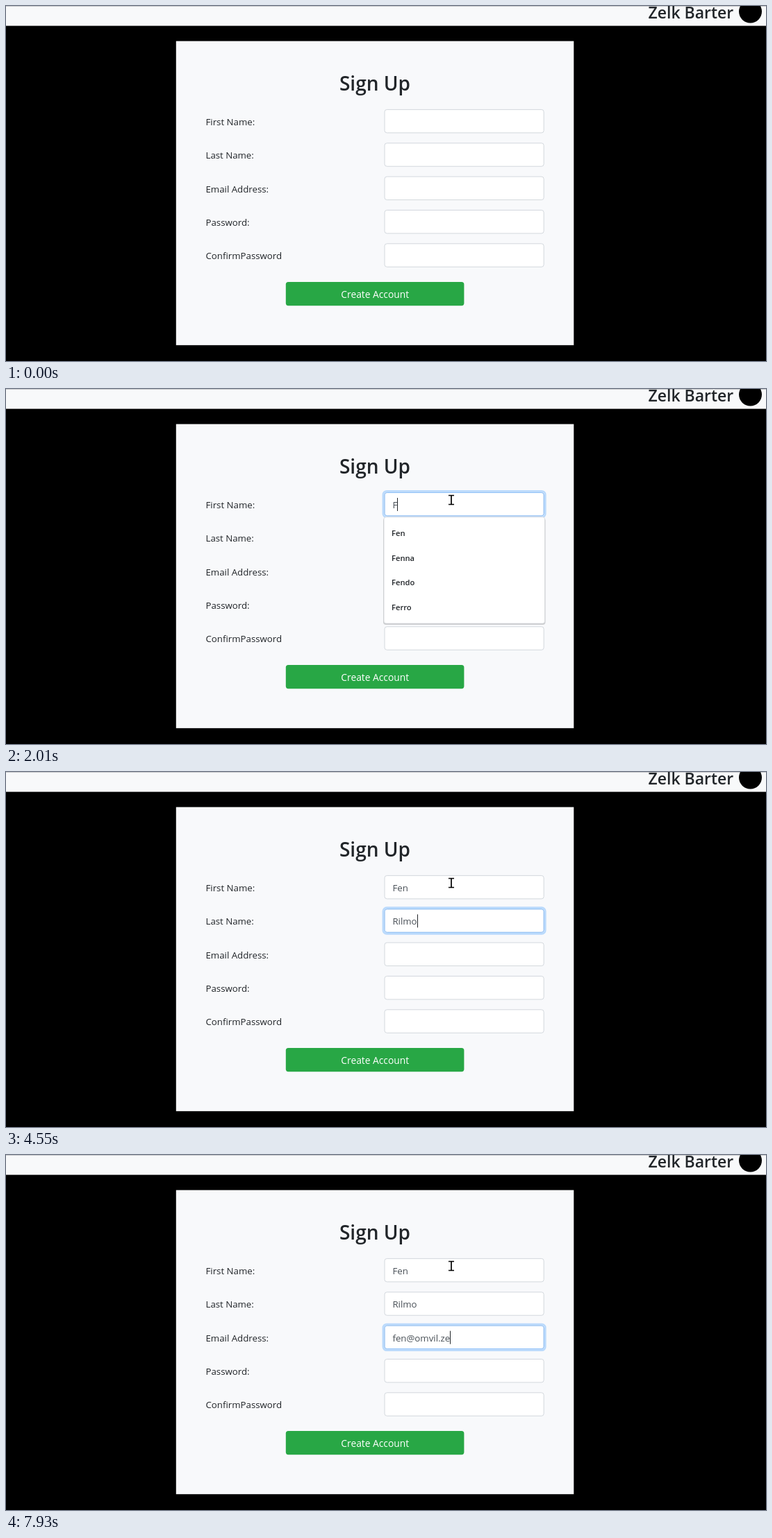
Recreate the animation shown at these times as an HTML page. Size 1094 by 512 pixels, loop 8000 ms.

```html
<!DOCTYPE html>
<html lang="en">
<head>
<meta charset="utf-8">
<title>Sign Up</title>
<style>
  html, body { margin: 0; height: 100%; overflow: hidden; background: #000; }
  svg { display: block; width: 100vw; height: 100vh; font: 13.25px "Open Sans", "Noto Sans", sans-serif; fill: #212529; }
  .head { font-weight: 600; }
  .item { font-size: 11.2px; font-weight: 600; }
  .value { fill: #495057; }
</style>
</head>
<body>
<svg id="stage" viewBox="0 0 1094 512">
  <rect width="1094" height="512" fill="#000"/>
  <rect width="1094" height="28.6" fill="#f8f9fa"/>
  <rect width="1094" height="1" fill="#c8cacc"/>
  <text class="head" x="924.5" y="18" font-size="23">Zelk Barter</text>
  <circle cx="1071.5" cy="8" r="16.5" fill="#000"/>
  <rect x="244.8" y="50.6" width="572.5" height="438.6" fill="#f8f9fb"/>
  <text class="head" x="531" y="122" font-size="28" text-anchor="middle">Sign Up</text>
  <g id="form"></g>
  <rect x="402.8" y="398" width="256.6" height="34.2" rx="3.6" fill="#28a745"/>
  <text x="531.2" y="421" fill="#fff" font-size="13.8" text-anchor="middle">Create Account</text>
  <g id="menu">
    <rect id="shadow" x="543" width="233.5" rx="4" fill="#000" opacity=".18"/>
    <rect id="sheet" x="544" width="231.5" rx="3" fill="#fff" stroke="#d5d8dc" stroke-width=".8"/>
    <g id="items"></g>
  </g>
  <path id="caret" stroke="#212529"/>
  <g id="mouse">
    <path id="arrow" d="M0 0V16.5L3.8 12.9L6.4 18.8L8.8 17.8L6.2 12H11.6Z" fill="#fff" stroke="#000"/>
    <g id="beam" fill="none">
      <path d="M-4 -6.5H4M0 -6.5V6.5M-4 6.5H4" stroke="#fff" stroke-width="3.4"/>
      <path d="M-4 -6.5H4M0 -6.5V6.5M-4 6.5H4" stroke="#000" stroke-width="1.7"/>
    </g>
  </g>
</svg>
<script>
const LOOP = 8000, LEFT = 545, WIDTH = 229.2, HEIGHT = 33.5, TEXT_X = 556.4;
const $ = id => document.getElementById(id);
const clamp = v => Math.max(0, Math.min(1, v));

function add(parent, tag, attrs, text = "") {
  const el = document.createElementNS("http://www.w3.org/2000/svg", tag);
  set(el, attrs);
  el.textContent = text;
  return parent.appendChild(el);
}
function set(el, attrs) {
  for (const k in attrs) el.setAttribute(k, attrs[k]);
}

// focus: when the field becomes active; keys: when each letter is typed
const fields = [
  { label: "First Name:", text: "Fen", focus: 1280, keys: [2010, 2220, 2400], open: 1400,
    hints: ["Fen", "Fenna", "Olva", "Fendo", "Marn", "Ferro", "Juk"] },
  { label: "Last Name:", text: "Rilmo", focus: 2880, keys: [3560, 3810, 3970, 4150, 4360], open: 3600,
    hints: ["Rilmo"] },
  { label: "Email Address:", text: "fen@omvil.ze", focus: 4590,
    keys: [5080, 5260, 5460, 6450, 6980, 7110, 7260, 7350, 7450, 7650, 7860, 7930] },
  { label: "Password:" },
  { label: "ConfirmPassword" }
];

fields.forEach((f, i) => {
  f.y = 149.4 + 48.35 * i;
  const textY = f.y + 22.6;
  add($("form"), "text", { x: 287.5, y: textY }, f.label);
  f.ring = add($("form"), "rect", { x: LEFT - 2, y: f.y - 2, width: WIDTH + 4, height: HEIGHT + 4, rx: 5,
    fill: "none", stroke: "#007bff", "stroke-opacity": .25, "stroke-width": 2.9 });
  const box = { x: LEFT, y: f.y, width: WIDTH, height: HEIGHT, rx: 3.4, "stroke-width": .9 };
  add($("form"), "rect", { ...box, fill: "#fff", stroke: "#ced4da" });
  f.edge = add($("form"), "rect", { ...box, fill: "none", stroke: "#80bdff" });
  f.value = add($("form"), "text", { class: "value", x: TEXT_X, y: textY });
});

function drawMenu(f, typed, t) {
  const shown = f && f.hints && t >= f.open && t < f.keys.at(-1) + 70;
  $("menu").style.display = shown ? "" : "none";
  if (!shown) return;
  const names = f.hints.filter(n => n.startsWith(typed));
  const top = f.y + 35.3, height = 46 + 35.8 * (names.length - 1);
  set($("shadow"), { y: top + 1, height: height + 1 });
  set($("sheet"), { y: top, height });
  $("items").replaceChildren();
  names.forEach((n, i) => add($("items"), "text", { class: "item", x: 555, y: top + 27 + 35.8 * i }, n));
}

function drawMouse(t) {
  const p = 1 - (1 - clamp((t - 545) / 680)) ** 2;
  const x = 1080 - 439 * p, y = 506 - 346 * p;
  const overField = x > LEFT && x < LEFT + WIDTH && fields.some(f => y > f.y && y < f.y + HEIGHT);
  $("mouse").style.display = t < 560 ? "none" : "";
  set($("mouse"), { transform: `translate(${x} ${y})` });
  $("arrow").style.display = overField ? "none" : "";
  $("beam").style.display = overField ? "" : "none";
}

function draw(t) {
  const active = fields.findLast(f => t >= f.focus);
  let typed = "";
  fields.forEach((f, i) => {
    if (!f.text) {
      f.ring.style.opacity = f.edge.style.opacity = 0;
      return;
    }
    const fade = start => clamp((t - start - 40) / 120);
    const next = fields[i + 1].focus ?? Infinity;
    f.ring.style.opacity = f.edge.style.opacity = fade(f.focus) * (1 - fade(next));
    f.value.textContent = f.text.slice(0, f.keys.filter(k => t >= k).length);
    if (f === active) typed = f.value.textContent;
  });

  let blinkOn = false;
  if (active) {
    const last = Math.max(active.focus, ...active.keys.filter(k => t >= k));
    blinkOn = (t - last) % 1060 < 530;
    const x = Math.round(TEXT_X + (typed ? active.value.getComputedTextLength() : 0)) + .5;
    set($("caret"), { d: `M${x} ${active.y + 7.6}v19` });
  }
  $("caret").style.display = blinkOn ? "" : "none";
  drawMenu(active, typed, t);
  drawMouse(t);
}

const start = performance.now();
function tick() {
  draw((performance.now() - start) % LOOP);
  requestAnimationFrame(tick);
}
tick();
</script>
</body>
</html>
```
